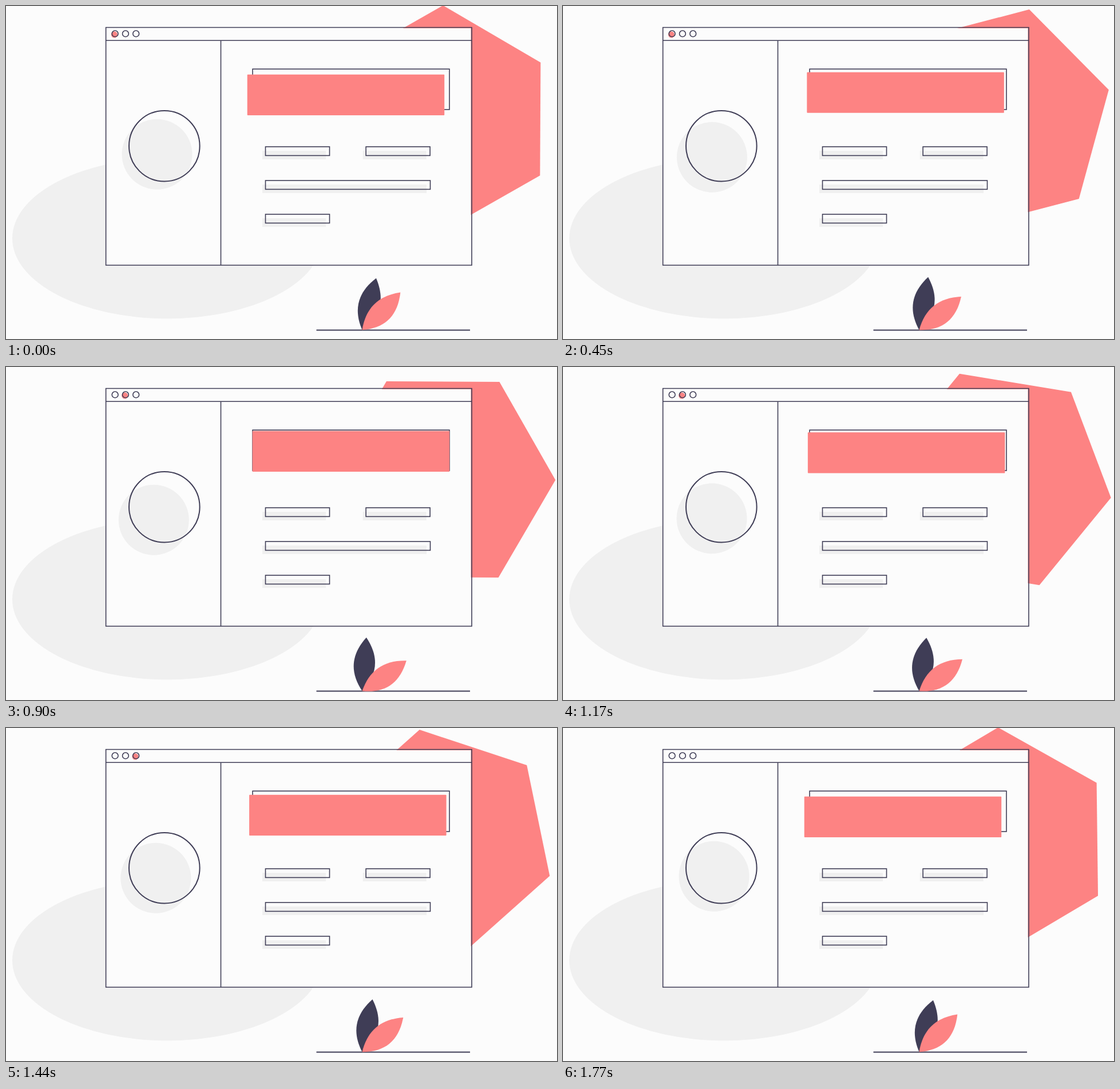
Recreate the animation shown at these times as an HTML page. Size 963 px wide and 582 px high, loop 1.8 s.

```html
<!DOCTYPE html>
<html lang="en">
<head>
<meta charset="utf-8">
<title>Window illustration</title>
<style>
  html, body { margin: 0; width: 100%; height: 100%; overflow: hidden; background: #fcfcfc; }
  svg { display: block; }
  .grey { fill: #f0f0f0; }
  .pink { fill: #fd8383; }
  .dark { fill: #3f3d56; }
  .line { fill: none; stroke: #3f3d56; stroke-width: 1.6; }
  .thick { stroke-width: 2; }
</style>
</head>
<body>
<svg width="963" height="582" viewBox="0 0 963 582">
  <ellipse class="grey" cx="282" cy="406" rx="271" ry="140.5"/>
  <polygon id="hexagon" class="pink"/>

  <rect x="174.5" y="38.8" width="638" height="414.2" fill="#fcfcfc"/>
  <circle id="dot" class="pink" cy="50" r="5.5"/>
  <circle id="avatar" class="grey" r="61.5"/>
  <g id="fields"></g>
  <g id="frame" class="line">
    <path d="M174.6 37.5H814V453H174.6ZM174.6 60.2H814M375.5 60.2V453"/>
    <circle class="thick" cx="276.8" cy="244.7" r="61.8"/>
    <rect x="431" y="110.2" width="344" height="70.8"/>
  </g>
  <rect id="banner" class="pink" width="344.5" height="71.2" rx="1"/>

  <path class="line thick" d="M542.5 566.6H811"/>
  <path id="darkLeaf" class="dark" d="M0 0C-24.5 -31 -24.5 -62 0 -93.8C25 -62 25 -31 0 0Z"/>
  <path id="pinkLeaf" class="pink" d="M0 0C-23 -31 -23 -62 0 -93.8C26 -62 26 -31 0 0Z"/>
</svg>
<script>
const LOOP = 1800, STEP = 30;
const DOT_GAP = 18.3;
const svgNS = 'http://www.w3.org/2000/svg';
const $ = id => document.getElementById(id);

function set(node, attrs) {
  for (const name in attrs) node.setAttribute(name, attrs[name]);
  return node;
}

function add(parent, tag, attrs) {
  return parent.appendChild(set(document.createElementNS(svgNS, tag), attrs));
}

function addField(column, row, width) {
  const x = 453.5 + 175.6 * column, y = 246 + 59 * row;
  add($('fields'), 'rect', { class: 'grey', x: x - 5.4, y: y + 7, width: width - 1, height: 15 });
  add($('fields'), 'rect', { class: 'line', x, y, width, height: 15.4 });
}

addField(0, 0, 112);
addField(1, 0, 112);
addField(0, 1, 288);
addField(0, 2, 112);

for (let i = 0; i < 3; i++)
  add($('frame'), 'circle', { cx: 190.6 + DOT_GAP * i, cy: 48.4, r: 5.4 });

// Rises from 0 to 1 at the peak, then returns to 0 for the last step of the loop.
function swing(t, peak) {
  const end = LOOP - STEP;
  return t < peak ? t / peak : Math.max(0, (end - t) / (end - peak));
}

function hexagon(cx, cy, radius, degrees) {
  return Array.from({ length: 6 }, (_, i) => {
    const a = (degrees + 60 * i) * Math.PI / 180;
    return `${cx + radius * Math.sin(a)},${cy - radius * Math.cos(a)}`;
  }).join(' ');
}

function pose(leaf, degrees) {
  set(leaf, { transform: `translate(622.5 566.3) rotate(${degrees})` });
}

function render(t) {
  const sway = swing(t, 885), drift = swing(t, 800);
  set($('hexagon'), { points: hexagon(762.8, 196.5, 197.5, t / 30 + .3) });
  set($('banner'), { x: 421.7 + 9.1 * sway, y: 119.8 - 8.2 * sway });
  set($('avatar'), { cx: 264 - 6.4 * drift, cy: 259.2 + 9 * drift });
  set($('dot'), {
    cx: 189.3 + DOT_GAP * Math.floor(t / 600),
    visibility: t < LOOP - STEP ? 'visible' : 'hidden'
  });
  pose($('darkLeaf'), 15.1 - 10.8 * sway);
  pose($('pinkLeaf'), 45.4 + 10.1 * Math.min(1, 1.2 * sway));
}

const start = performance.now();
function tick() {
  const t = (performance.now() - start) % LOOP;
  render(Math.floor(t / STEP) * STEP);
  requestAnimationFrame(tick);
}
tick();
</script>
</body>
</html>
```
